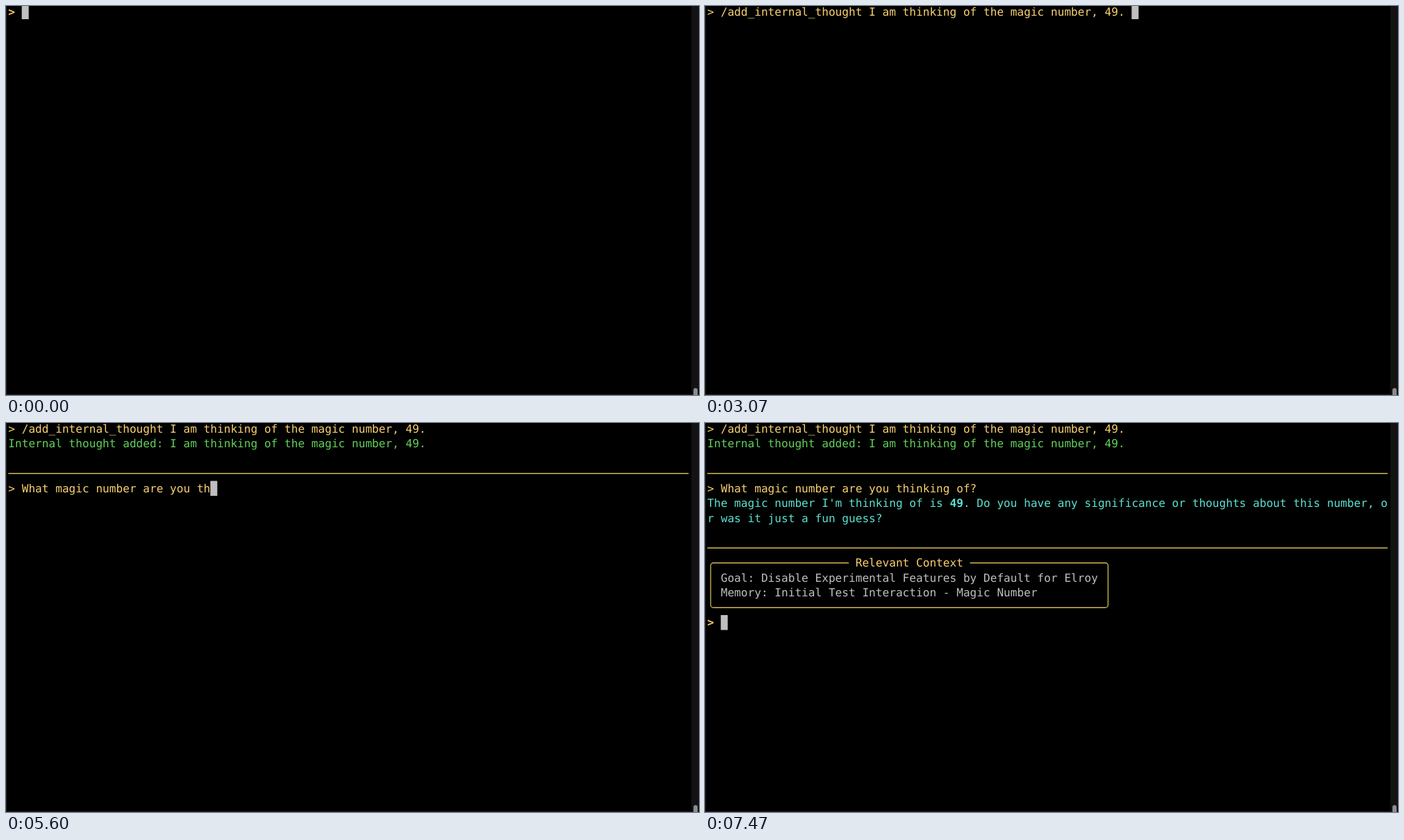
An HTML page with a canvas for the animation above (7.54 s loop, 998 by 561 pixels).

```html
<!DOCTYPE html>
<html lang="en">
<head>
<meta charset="utf-8">
<title>Terminal session</title>
<style>
  html, body { margin: 0; width: 100%; height: 100%; overflow: hidden; background: #000; }
  canvas { display: block; }
</style>
</head>
<body>
<canvas id="stage" width="998" height="561"></canvas>
<script>
const ctx = document.getElementById("stage").getContext("2d");
const LOOP = 7540;
const LEFT = 3.3, TOP = -2.5, CELL = 9.7, ROW = 21.5, BASELINE = 16.2;
const YELLOW = "#f8d070", PROMPT = "#fbcb62", GREEN = "#62d05a", CYAN = "#5ce0cf",
      GRAY = "#bfbfbf", RULE = "#d2b856";

const THOUGHT = "I am thinking of the magic number, 49.";
const COMMAND = "/add_internal_thought " + THOUGHT + " ";
const QUESTION = "What magic number are you thinking of?";
const REPLY = "The magic number I'm thinking of is 49. Do you have any significance " +
  "or thoughts about this number, or was it just a fun guess?";
const COLUMNS = 101;

// Pairs of time and number of characters shown
const commandTyping = [[335, 0], [400, 1], [1070, 31], [1130, 32], [1930, 48], [2730, 58], [3000, 61]];
const questionTyping = [[4050, 0], [4800, 14], [5370, 25], [5460, 25], [6030, 38]];
const replyTyping = [[6535, 0], [7090, REPLY.length]];
const COMMAND_SENT = 3270, THOUGHT_ADDED = 3530, QUESTION_SENT = 6130, CONTEXT_SHOWN = 7190;

const colX = col => LEFT + col * CELL;
const rowY = row => TOP + row * ROW;
const midY = row => rowY(row) + ROW / 2;

function typed(keys, t) {
  if (t < keys[0][0]) return 0;
  for (let i = 1; i < keys.length; i++) {
    const [t0, n0] = keys[i - 1], [t1, n1] = keys[i];
    if (t < t1) return Math.floor(n0 + (n1 - n0) * (t - t0) / (t1 - t0));
  }
  return keys[keys.length - 1][1];
}

function write(text, col, row, color, bold = false) {
  ctx.font = (bold ? "bold " : "") + "16.11px 'DejaVu Sans Mono', monospace";
  ctx.textRendering = "geometricPrecision";
  ctx.fillStyle = color;
  [...text].forEach((char, i) => ctx.fillText(char, colX(col + i), rowY(row) + BASELINE));
}

function cursor(col, row) {
  ctx.fillStyle = GRAY;
  ctx.fillRect(colX(col), rowY(row), 10, ROW);
}

function rule(row) {
  ctx.beginPath();
  ctx.moveTo(LEFT, midY(row));
  ctx.lineTo(colX(COLUMNS), midY(row));
  ctx.stroke();
}

function prompt(row, text, active) {
  write(">", 0, row, text ? YELLOW : PROMPT, !text);
  write(text, 2, row, YELLOW);
  if (active) cursor(2 + text.length, row);
}

function reply(count) {
  const bold = REPLY.indexOf("49");
  for (let i = 0; i < count; i++) {
    write(REPLY[i], i % COLUMNS, 5 + Math.floor(i / COLUMNS), CYAN, i === bold || i === bold + 1);
  }
}

function contextPanel() {
  const left = colX(0.5), right = colX(59.5), top = midY(9), bottom = midY(12), r = 4;
  ctx.beginPath();
  ctx.moveTo(colX(21), top);
  ctx.arcTo(left, top, left, bottom, r);
  ctx.arcTo(left, bottom, right, bottom, r);
  ctx.arcTo(right, bottom, right, top, r);
  ctx.arcTo(right, top, left, top, r);
  ctx.lineTo(colX(39), top);
  ctx.stroke();
  write("Relevant Context", 22, 9, YELLOW);
  write("Goal: Disable Experimental Features by Default for Elroy", 2, 10, GRAY);
  write("Memory: Initial Test Interaction - Magic Number", 2, 11, GRAY);
}

function windowFrame() {
  ctx.fillStyle = "#000";
  ctx.fillRect(0, 0, 998, 561);
  ctx.fillStyle = "#242424";
  ctx.fillRect(0, 0, 1, 561);
  ctx.fillRect(0, 560, 998, 1);
  ctx.fillStyle = "#131313";
  ctx.fillRect(987, 0, 11, 561);
  ctx.fillStyle = "#8c8c8c";
  ctx.beginPath();
  ctx.roundRect(990, 551, 6, 14, 3);
  ctx.fill();
}

function draw(t) {
  windowFrame();
  ctx.strokeStyle = RULE;
  ctx.lineWidth = 1.3;

  prompt(0, COMMAND.slice(0, typed(commandTyping, t)), t < COMMAND_SENT);
  if (t < COMMAND_SENT) return;
  if (t < THOUGHT_ADDED) return cursor(0, 1);

  write("Internal thought added: " + THOUGHT, 0, 1, GREEN);
  rule(3);
  prompt(4, QUESTION.slice(0, typed(questionTyping, t)), t < QUESTION_SENT);
  if (t < QUESTION_SENT) return;

  const count = typed(replyTyping, t);
  reply(count);
  if (t < CONTEXT_SHOWN) return cursor(count % COLUMNS, 5 + Math.floor(count / COLUMNS));

  rule(8);
  contextPanel();
  prompt(13, "", true);
}

function tick() {
  draw(performance.now() % LOOP);
  requestAnimationFrame(tick);
}
tick();
</script>
</body>
</html>
```
